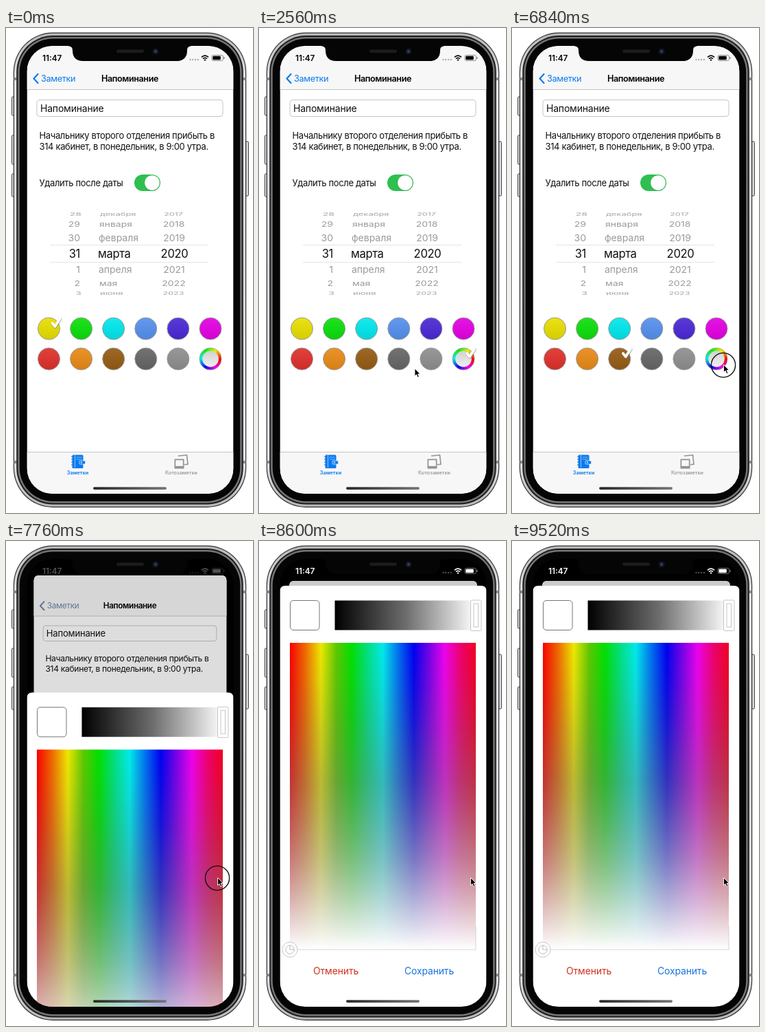
Animation, 360 px wide and 705 px high, one loop 9560 ms. Source, as an HTML page:

```html
<!DOCTYPE html>
<html lang="ru">
<head>
<meta charset="utf-8">
<title>Напоминание</title>
<style>
html, body { margin: 0; width: 100%; height: 100%; overflow: hidden; background: #fff; }
svg { display: block; width: 100%; height: 100%; }
text { font-family: Inter, Roboto, sans-serif; }
</style>
</head>
<body>
<svg id="stage" viewBox="0 0 360 705"></svg>
<script>
const LOOP = 9560;
const stage = document.getElementById('stage');

const text = (x, y, str, size, fill, extra = '') =>
  `<text x="${x}" y="${y}" font-size="${size}" fill="${fill}" ${extra}>${str}</text>`;
const rect = (x, y, w, h, r, fill, extra = '') =>
  `<rect x="${x}" y="${y}" width="${w}" height="${h}" rx="${r}" fill="${fill}" ${extra}/>`;
const circle = (x, y, r, fill, extra = '') =>
  `<circle cx="${x}" cy="${y}" r="${r}" fill="${fill}" ${extra}/>`;
const path = (d, fill, extra = '') => `<path d="${d}" fill="${fill}" ${extra}/>`;
const gradient = (id, dir, stops) => `<linearGradient id="${id}" ${dir}>` +
  stops.map(([at, color, o = 1]) =>
    `<stop offset="${at}" stop-color="${color}" stop-opacity="${o}"/>`).join('') +
  '</linearGradient>';
const tight = 'letter-spacing="-.35"';
const down = 'x2="0" y2="1"';

const hues = ['#fa0000', '#f06a00', '#eee800', '#5cc800', '#00e000', '#00e080', '#00eaea',
  '#0070f0', '#0000f0', '#7800e8', '#ee00ee', '#ee0070', '#f00020'];
const defs = `<defs>
  <clipPath id="screen">${rect(30.5, 26, 301, 651, 37, '#000')}</clipPath>
  <clipPath id="wheel">${rect(60, 264, 240, 127, 0, '#000')}</clipPath>
  ${gradient('steel', down, [[0, '#b4b6b8'], [.1, '#e6e7e8'], [.5, '#d6d7d9'], [.9, '#e6e7e8'], [1, '#b4b6b8']])}
  ${gradient('shade', down, [[0, '#fff', .08], [1, '#000', .08]])}
  ${gradient('disc', down, [[0, '#d2d2d2'], [1, '#efefef']])}
  ${gradient('grey', '', [[0, '#000'], [.5, '#6c6c6c'], [1, '#fff']])}
  ${gradient('bar', '', [[0, '#2a2a2c'], [1, '#777']])}
  ${gradient('hue', '', hues.map((c, i) => [i / 12, c]))}
  ${gradient('fade', down, [[0, '#666', 0], [.12, '#666', .08], [.25, '#6a6a6a', .2], [.45, '#787878', .42],
    [.7, '#b0b0b0', .67], [.88, '#e0e0e0', .87], [1, '#fff', 1]])}
</defs>`;

// Phone shell: nested rings, each given by its inset from the outline
const button = (x, y, h) => rect(x, y, 5, h, 1.5, '#d8d8d8', 'stroke="#333" stroke-width=".9"');
const ring = (d, fill) => rect(10.8 + d, 6.6 + d, 339.4 - 2 * d, 690.4 - 2 * d, 57.5 - d, fill);
const shell =
  button(8.4, 100, 27) + button(8.4, 156, 42) + button(8.4, 212, 33) + button(348.5, 165, 79) +
  ring(0, '#333') + ring(1.2, 'url(#steel)') +
  [72, 629].map(y => rect(11.5, y, 4, 4, 0, '#888') + rect(345.5, y, 4, 4, 0, '#888')).join('') +
  ring(4.5, '#1c1c1c') + ring(6.5, '#75767a') + ring(9, '#050505');

// Date wheel
const months = ['ноября', 'декабря', 'января', 'февраля', 'марта', 'апреля', 'мая', 'июня', 'июля'];
const days = [27, 28, 29, 30, 31, 1, 2, 3, 4];
function wheelRow(month, i) {
  const k = i - 4, a = k * 20.5 * Math.PI / 180;
  const far = Math.abs(k), size = k ? 14 : 16.6;
  const fill = k ? ['#999', '#999', '#a2a2a2', '#aaa'][far - 1] : '#111';
  const y = 328 + 65.8 * Math.sin(a), base = size * .36;
  const track = k ? '' : tight;
  return `<g transform="translate(0 ${y.toFixed(2)}) scale(1 ${Math.cos(a).toFixed(3)})">` +
    text(108 + (far > 2 ? 2 : 0), base, days[i], size, fill, `text-anchor="end" ${track}`) +
    text(134 + far, base, month, far > 2 ? 13 : size, fill, track) +
    text(245.5 - far / 2, base, 2016 + i, far > 2 ? 12.5 : size, fill, `text-anchor="middle" ${track}`) +
    '</g>';
}
const wheel = `<g clip-path="url(#wheel)">${months.map(wheelRow).join('')}</g>` +
  path('M64 315.5H295M64 340.5H295', 'none', 'stroke="#dedede" stroke-width=".8"');

// Colour buttons
const colors = ['#e8df00', '#0be00a', '#00e8ec', '#5590ee', '#4b28d6', '#e400e2',
  '#e0302b', '#e88a16', '#965b14', '#666', '#8f8f8f', ''];
const spot = i => [62.5 + i % 6 * 47.1, i < 6 ? 437 : 481];
function rainbow(x, y) {
  let out = '';
  for (let h = 0; h < 360; h += 5) {
    const a = h * Math.PI / 180, c = Math.cos(a), s = -Math.sin(a);
    out += `<line x1="${x + 11 * c}" y1="${y + 11 * s}" x2="${x + 16 * c}" y2="${y + 16 * s}" stroke="hsl(${h} 95% 48%)" stroke-width="2"/>`;
  }
  return out + circle(x, y, 16, 'none', 'stroke="#999" stroke-width=".8"') +
    circle(x, y, 11.8, 'url(#disc)') + circle(x, y, 4, '#999', 'id="dot"');
}
const swatches = colors.map((c, i) => {
  const [x, y] = spot(i);
  return c ? circle(x, y, 16, c) + circle(x, y, 16, 'url(#shade)', 'stroke="#999" stroke-width="1"')
    : rainbow(x, y);
}).join('');
const tick = 'M5.2 -8L9 -3.2L16.2 -14.5';
const check = `<g id="check" fill="none" stroke-linecap="round" stroke-linejoin="round">` +
  path(tick, 'none', 'stroke="#777" stroke-opacity=".5" stroke-width="4.8" transform="translate(.4 .7)"') +
  path(tick, 'none', 'stroke="#fff" stroke-width="3.7"') + '</g>';

// Tab icons
const notebook = rect(96.5, 620.5, 16, 19.5, 1.5, 'currentColor') +
  path('M95 623h3M95 627h3M95 631h3M95 635h3', 'none', 'stroke="currentColor" stroke-width="1.2"') +
  path('M100.5 621v18', 'none', 'stroke="#f7f7f7" stroke-width=".6"') +
  path('M102.5 624h8M102.5 627h8', 'none', 'stroke="#9cc8f6" stroke-width=".8"') +
  rect(107, 629, 8.5, 5, 1, 'currentColor', 'stroke="#f7f7f7" stroke-width=".7"') +
  circle(110, 631.5, .9, '#fff');
const photos = path('M251 622L263.5 620.8L265 634L260 634.8', 'none', 'stroke="#929292" stroke-width="1.6"') +
  rect(245.5, 626.5, 14, 14, .5, '#929292') + rect(247.2, 628.2, 10.6, 8.6, 0, '#f7f7f7');

const page = `<g id="page" color="#0a7aef">` +
  rect(30.5, 26, 301, 651, 8, '#fff', 'id="paper"') +
  path('', '#f7f7f7', 'id="nav"') +
  rect(30.5, 616, 301, 61, 0, '#f7f7f7') +
  path('M30.5 89.5H331.5M30.5 616.5H331.5', 'none', 'stroke="#b8b8b8" stroke-width=".8"') +
  path('M46.5 67L40.5 73.5L46.5 80', 'none', 'stroke="currentColor" stroke-width="2.2" stroke-linecap="round" stroke-linejoin="round"') +
  text(51, 78, 'Заметки', 12.7, 'currentColor', tight) +
  text(180.5, 78, 'Напоминание', 12.6, '#000', 'text-anchor="middle" font-weight="600" letter-spacing="-.4"') +
  rect(45, 104.5, 271, 24, 4, '#fff', 'stroke="#c4c4c4" stroke-width="1"') +
  text(50, 121.5, 'Напоминание', 14, '#111', 'letter-spacing="-.2"') +
  text(48.5, 160.5, 'Начальнику второго отделения прибыть в', 13, '#111', tight) +
  text(48.5, 176.5, '314 кабинет, в понедельник, в 9:00 утра.', 13, '#111', tight) +
  text(48.5, 230, 'Удалить после даты', 13, '#111', tight) +
  rect(187, 213, 38, 24, 12, '#2fbf50') +
  circle(213, 225.6, 11, '#000', 'opacity=".15"') + circle(213, 225, 10.8, '#fff') +
  wheel + swatches + check + notebook + photos +
  text(104.5, 649, 'Заметки', 7.3, 'currentColor', 'text-anchor="middle" font-weight="600"') +
  text(255.5, 649, 'Котозаметки', 7.3, '#929292', 'text-anchor="middle" font-weight="500"') +
  rect(30.5, 26, 301, 651, 8, '#000', 'id="dim" opacity="0"') + '</g>';

// Colour picker, laid out in its final place
const line = 'stroke="#c6c6c6" stroke-width="1"';
const sheet = `<g id="sheet">` +
  path('M30.5 720V73Q30.5 65 38.5 65H323.5Q331.5 65 331.5 73V720Z', '#fff') +
  rect(45.5, 86.5, 42.5, 43, 4.5, '#fff', 'stroke="#777" stroke-width="1"') +
  rect(110.5, 86.5, 205.5, 43, 0, 'url(#grey)') +
  rect(308.5, 86, 15.5, 44.5, 1.5, '#fff', line) +
  rect(313, 91, 6.5, 34, 0, '#fff', line) +
  rect(45, 148, 271, 446, 0, 'url(#hue)') +
  rect(45, 148, 271, 446, 0, 'url(#fade)') +
  path('M45 594H316V560', 'none', 'stroke="#ccc" stroke-width=".8"') +
  circle(45, 594, 11, '#fff', line) + circle(45, 594, 6.2, '#fff', 'stroke="#bbb" stroke-width="1"') +
  path('M45 588V594H51', 'none', 'stroke="#bbb" stroke-width="1"') +
  text(79, 630, 'Отменить', 13.9, '#d2301c', 'letter-spacing="-.1"') +
  text(212, 630, 'Сохранить', 13.9, '#1673dd', 'letter-spacing="-.1"') + '</g>';

const notch = path('M88 24V26C95 26 97 28 97 33C97 43 103 48 112 48H249C258 48 264 43 264 33C264 28 266 26 273 26V24Z', '#050505') +
  rect(161, 31.5, 40, 4.5, 2.2, '#1c1c1e') + circle(218, 34, 4.5, '#14161f') + circle(218, 34, 2, '#28407c');
const status = `<g id="status" color="#000">` +
  text(53, 48, '11:47', 11.8, 'currentColor', 'font-weight="600"') +
  [0, 1, 2, 3].map(i => circle(268.5 + i * 3.8, 46, 1.2, 'currentColor', 'opacity=".3"')).join('') +
  path('M285 42.4Q290 37.8 295 42.4M287 44.6Q290 42 293 44.6', 'none', 'stroke="currentColor" stroke-width="1.6"') +
  path('M288.4 46.2Q290 45 291.6 46.2L290 48Z', 'currentColor') +
  rect(300, 39.5, 16.5, 8, 2.2, 'none', 'stroke="currentColor" stroke-opacity=".5" stroke-width=".8"') +
  rect(301.3, 40.8, 11.5, 5.4, 1.2, 'currentColor') + rect(317.4, 42, 1.2, 3, .6, 'currentColor', 'opacity=".5"') +
  '</g>';
const cursor = `<g id="cursor">` +
  circle(-.5, .5, 17.6, 'none', 'id="touch" stroke="#111" stroke-width="1.4"') +
  path('M0 0V11L2.6 8.8L4.4 13L6.4 12.1L4.6 8H8Z', '#000', 'stroke="#fff" stroke-width=".9" stroke-linejoin="round"') + '</g>';

stage.innerHTML = defs + shell +
  `<g clip-path="url(#screen)">${rect(30, 26, 302, 651, 0, '#000')}${page}${sheet}</g>` +
  notch + status + rect(127, 667.3, 107, 3.6, 1.8, 'url(#bar)') + cursor;

const part = {};
for (const el of stage.querySelectorAll('[id]')) part[el.id] = el;
const set = (id, name, value) => part[id].setAttribute(name, value);
const clamp = v => Math.min(1, Math.max(0, v));
const mix = (a, b, p) => a + (b - a) * p;

const moves = [[250, 60, 497], [550, 60, 486], [950, 60, 486], [1800, 292, 486], [2250, 292, 486],
  [2560, 227, 495], [2900, 160, 487], [3400, 160, 487], [4600, 308.5, 489.5]];
const presses = [[600, 800], [1900, 2060], [3000, 3160], [4750, 7950]];
const picks = [[0, 0], [800, 6], [2060, 11], [3160, 8]];

function cursorAt(t) {
  const next = moves.findIndex(m => m[0] > t);
  if (next < 0) return moves[moves.length - 1].slice(1);
  const [t0, x0, y0] = moves[Math.max(0, next - 1)], [t1, x1, y1] = moves[next];
  const u = clamp((t - t0) / (t1 - t0 || 1)), e = u * u * (3 - 2 * u);
  return [mix(x0, x1, e), mix(y0, y1, e)];
}

function draw(t) {
  const [cx, cy] = cursorAt(t);
  set('cursor', 'transform', `translate(${cx} ${cy})`);
  set('cursor', 'visibility', t < 250 ? 'hidden' : 'visible');
  set('touch', 'opacity', presses.some(([a, b]) => t >= a && t < b) ? 1 : 0);

  const [, pick] = picks.filter(p => p[0] <= t).pop();
  set('check', 'transform', `translate(${spot(pick)})`);

  const d = (t - 4800) / 500;
  set('dot', 'opacity', d >= 0 && d < 1 ? 1 - d * d : 0);
  set('dot', 'r', 3 + 4 * clamp(d));

  // Critically damped spring lifts the sheet and pushes the page back
  const s = Math.max(0, t - 7563) * .0135;
  const p = 1 - Math.exp(-s) * (1 + s);
  const scale = 1 - .09 * p;
  set('sheet', 'transform', `translate(0 ${612 * (1 - p)})`);
  set('page', 'transform', `translate(181 ${26 + 32 * p}) scale(${scale}) translate(-181 -26)`);
  set('page', 'color', `rgb(${mix(10, 142, p)},${mix(122, 142, p)},${mix(239, 147, p)})`);
  set('dim', 'opacity', .18 * p);
  const r = mix(37, 8, clamp(p * 1.4));
  set('paper', 'rx', r);
  set('dim', 'rx', r);
  set('nav', 'd', `M30.5 89V${26 + r}Q30.5 26 ${30.5 + r} 26H${331.5 - r}Q331.5 26 331.5 ${26 + r}V89Z`);
  const v = Math.round(255 * clamp((t - 7600) / 500));
  set('status', 'color', `rgb(${v},${v},${v})`);
}

function frame() {
  draw(performance.now() % LOOP);
  requestAnimationFrame(frame);
}
frame();
</script>
</body>
</html>
```
